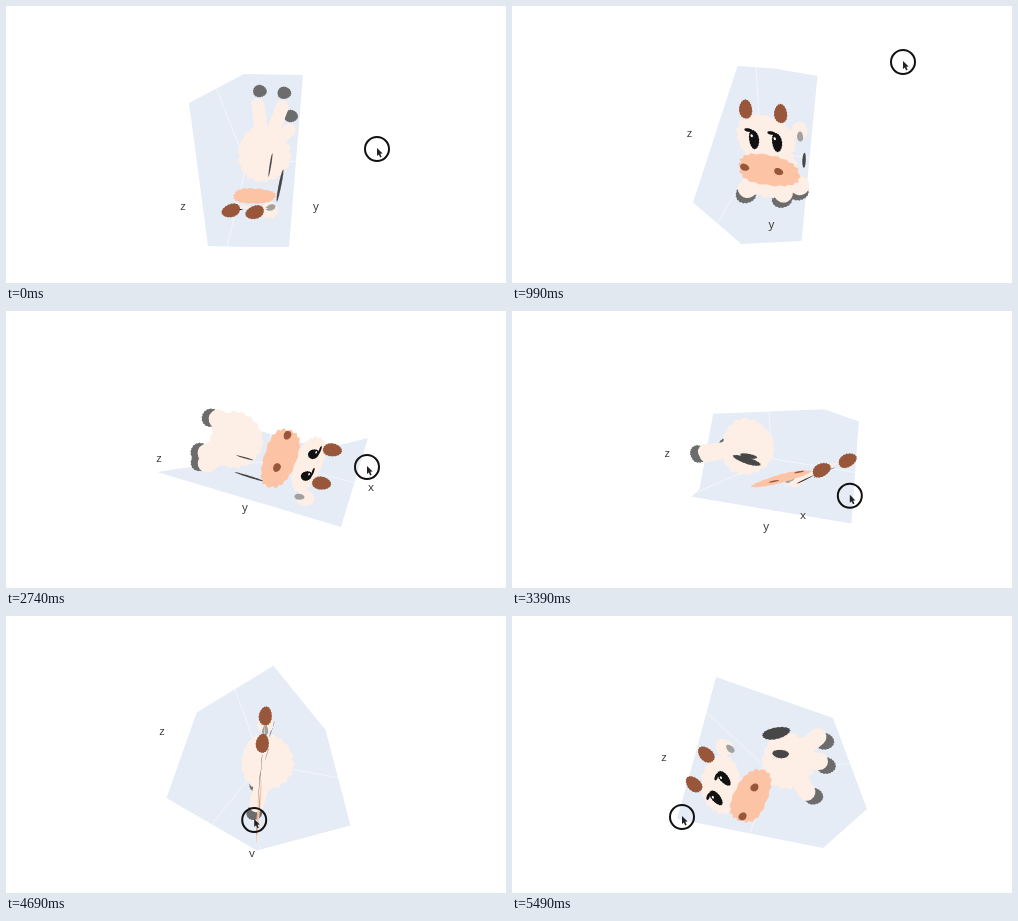
An HTML page with a canvas that plays this animation: 500 by 277 pixels, repeating every 5540 ms.

```html
<!DOCTYPE html>
<html lang="en">
<head>
<meta charset="utf-8">
<title>Turning cow point cloud</title>
<style>
html, body { margin: 0; width: 100%; height: 100%; overflow: hidden; background: #fff; }
canvas { display: block; }
</style>
</head>
<body>
<canvas id="stage" width="500" height="277"></canvas>
<script>
const ctx = document.getElementById('stage').getContext('2d');
const LOOP = 5540, FLOOR = 241, TAU = Math.PI * 2;
const CREAM = '#fdeee6', SALMON = '#fcc4a5', HORN = '#98563a', GREY = '#6c6c6c', DARK = '#474747';

// A view of the scene. points: eyes, body, then labels x, y, z.
// axes: sideways unit, eyes to muzzle, body to front feet. box: outline of the walls.
const views = [
  { t: 100,
    points: [[241,204], [258,148], [260,270], [310,201], [177,201]],
    axes: [[.68,.05], [7,-14], [8,-62]],
    box: [[183,97], [238,68], [297,69], [283,241], [240,241], [202,240]] },
  { t: 490,
    points: [[238,159], [275,152], [290,270], [213,238], [175,69]],
    axes: [[1,-.1], [9,24], [-6,30]],
    box: [[204,56], [233,47], [273,47], [306,229], [242,235], [174,160]] },
  { t: 1490,
    points: [[269,111], [243,176], [330,270], [306,200], [180,186]],
    axes: [[.95,.35], [-5,33], [-8,23]],
    box: [[247,64], [292,78], [338,93], [273,241], [217,241], [188,233]] },
  { t: 2390,
    points: [[304,154], [230,129], [365,177], [239,197], [153,148]],
    axes: [[-.31,.95], [-30,-7], [-30,-5]],
    box: [[212,108], [318,138], [362,127], [335,216], [151,161], [201,153]] },
  { t: 3890,
    points: [[297,181], [242,145], [194,241], [274,241], [158,136]],
    axes: [[-.35,-.38], [-30,14], [-36,18]],
    box: [[187,96], [305,46], [327,89], [345,208], [217,218], [170,210]] },
  { t: 4740,
    points: [[216,145], [278,147], [360,270], [221,235], [154,99]],
    axes: [[.78,-.66], [27,20], [15,34]],
    box: [[194,97], [234,53], [313,136], [344,211], [281,249], [152,157]] },
  { t: 5140,
    points: [[208,172], [276,145], [380,270], [221,262], [152,142]],
    axes: [[.35,-.85], [31,8], [32,20]],
    box: [[185,132], [204,61], [321,102], [355,193], [311,232], [165,203]] }
];

const pointer = [
  [100, 371,143], [490, 360,79], [840, 397,43], [990, 391,56], [1190, 391,56], [1690, 274,192],
  [1840, 271,196], [2740, 361,156], [4240, 307.5,222.5], [5090, 195.5,187.5], [5490, 170,201]
].map(([t, x, y]) => ({ t, spot: [x, y] }));

const clamp = (v, lo, hi) => Math.min(hi, Math.max(lo, v));
const lerp = (a, b, k) => a + (b - a) * k;
const slide = (p, q, k) => p.map((v, i) => lerp(v, q[i], k));

// Swings a vector the short way round, so that it does not shrink in between.
function swing(p, q, k) {
  const from = Math.atan2(p[1], p[0]);
  const arc = Math.atan2(p[0] * q[1] - p[1] * q[0], p[0] * q[0] + p[1] * q[1]);
  const size = lerp(Math.hypot(...p), Math.hypot(...q), k);
  return [size * Math.cos(from + arc * k), size * Math.sin(from + arc * k)];
}

// The neighbouring keys around t and the share of the way between them.
function between(keys, t) {
  const i = clamp(keys.findIndex(key => key.t >= t), 1, keys.length - 1);
  const a = keys[i - 1], b = keys[i];
  return [a, b, clamp((t - a.t) / (b.t - a.t), 0, 1)];
}

function viewAt(t) {
  const [a, b, k] = between(views, t);
  const blend = (key, rule) => a[key].map((p, i) => rule(p, b[key][i], k));
  return { points: blend('points', slide), axes: blend('axes', swing), box: blend('box', slide) };
}

// Adds scaled vectors to a point: move(p, 2, u, 3, v).
function move(p, ...terms) {
  let [x, y] = p;
  for (let i = 0; i < terms.length; i += 2) {
    x += terms[i] * terms[i + 1][0];
    y += terms[i] * terms[i + 1][1];
  }
  return [x, y];
}

function polygon(color, points) {
  ctx.beginPath();
  points.forEach(p => ctx.lineTo(...p));
  ctx.closePath();
  ctx.fillStyle = color;
  ctx.fill();
}

// A ragged disc in the plane of u and v; a power below 1 makes it squarer.
function blob(color, p, rx, ry, u = [1, 0], v = [0, 1], power = 1) {
  const bend = c => Math.sign(c) * Math.abs(c) ** power;
  polygon(color, Array.from({ length: 72 }, (_, i) => {
    const a = i / 72 * TAU, r = 1 + .03 * Math.sin(3 * a + 1) + .04 * Math.sin(18 * a);
    return move(p, rx * r * bend(Math.cos(a)), u, ry * r * bend(Math.sin(a)), v);
  }));
}

function drawWalls(box) {
  polygon('#e5ecf6', box);
  const centre = box.reduce((sum, p) => move(sum, 1 / 6, p), [0, 0]);
  ctx.strokeStyle = 'rgba(255,255,255,.5)';
  ctx.lineWidth = 1;
  ctx.beginPath();
  for (let i = 0; i < 6; i += 2) {
    ctx.moveTo(...slide(box[i], box[i + 1], .5));
    ctx.lineTo(...centre);
  }
  ctx.stroke();
}

function drawBody(body, side, down, back) {
  const size = Math.hypot(...side);
  const feet = [
    move(body, 30, side, .5, down, .15, back),
    move(body, 18, side, 1, down),
    move(body, -18, side, 1, down)
  ];
  feet.forEach(f => blob(GREY, f, 10 * size, 9 * size));
  ctx.strokeStyle = CREAM;
  ctx.lineCap = 'round';
  ctx.lineWidth = 19 * size;
  feet.forEach(f => {
    ctx.beginPath();
    ctx.moveTo(...body);
    ctx.lineTo(...move(f, -.22, down));
    ctx.stroke();
  });
  blob(CREAM, body, 26, 28);
  // Spots lie on the flank and narrow as it turns away.
  blob(DARK, move(body, 32, side, -.3, down, -.2, back), .18, .2, back, down);
  blob(DARK, move(body, 14, side, -.18, back), .09, .17, back, down);
}

function drawHead(eyes, side, nose, back) {
  const up = move([0, 0], -1.3, nose, .3, back);
  const tilt = Math.atan2(up[1], up[0]);
  const along = [Math.cos(tilt), Math.sin(tilt)], across = [-along[1], along[0]];
  const ear = move(eyes, 35, side, -.7, nose, .2, back);
  blob(CREAM, ear, 9, 8, along, across);
  blob('#a3a19f', move(ear, .2, nose), 5, 3, along, across);
  blob(CREAM, move(eyes, .1, up, .05, back), 29, .85, side, up);

  const muzzle = move(eyes, 1, nose);
  blob(SALMON, muzzle, 30, .52, side, nose, .8);
  // Nostrils sit on the far side when the muzzle points up.
  if (nose[1] > -10) [-24, 10].forEach(x => blob(HORN, move(muzzle, x, side), 4.5, .12, side, nose));

  for (const x of [-11.5, 11.5]) {
    const eye = move(eyes, x, side);
    blob('#111', eye, 5, .32, side, up);
    blob('#111', move(eye, -5, side, .3, up), 4, .06, side, up);
    blob('#fff', move(eye, -2, side, .12, up), 1.2, .05, side, up);
  }
  for (const x of [-17.5, 17.5]) blob(HORN, move(eyes, x, side, 1, up), 9.5, 6.5, along, across);
}

function drawLabels(spots) {
  ctx.fillStyle = '#333';
  ctx.font = '11.5px "Open Sans", sans-serif';
  ctx.textAlign = 'center';
  spots.forEach(([x, y], i) => ctx.fillText('xyz'[i], x, y + 3));
}

function drawPointer([x, y]) {
  ctx.strokeStyle = '#111';
  ctx.lineWidth = 2;
  ctx.beginPath();
  ctx.arc(x, y, 12, 0, TAU);
  ctx.stroke();
  const arrow = [[0,0], [0,8], [1.8,6.4], [3.2,9.4], [4.6,8.8], [3.3,5.8], [5.6,5.6]];
  polygon('#222', arrow.map(p => move(p, 1, [x, y - 1])));
}

function draw(now) {
  const time = now % LOOP;
  const t = time < 100 ? 0 : Math.max(100, Math.floor((time - 40) / 50) * 50 + 40);
  // The view rests while the pointer pauses.
  const turn = t - clamp(t - 990, 0, 200) - clamp(t - 1690, 0, 150);
  const { points: [eyes, body, ...labels], axes: [side, nose, down], box } = viewAt(turn);
  const back = move(body, -1, eyes);

  ctx.fillStyle = '#fff';
  ctx.fillRect(0, 0, 500, 277);
  ctx.save();
  ctx.beginPath();
  ctx.rect(0, 0, 500, FLOOR);
  ctx.clip();
  drawWalls(box);
  drawBody(body, side, down, back);
  drawHead(eyes, side, nose, back);
  drawLabels(labels);
  ctx.restore();

  const [a, b, k] = between(pointer, t);
  drawPointer(slide(a.spot, b.spot, k));
}

const start = performance.now();
function frame() {
  draw(performance.now() - start);
  requestAnimationFrame(frame);
}
frame();
</script>
</body>
</html>
```
